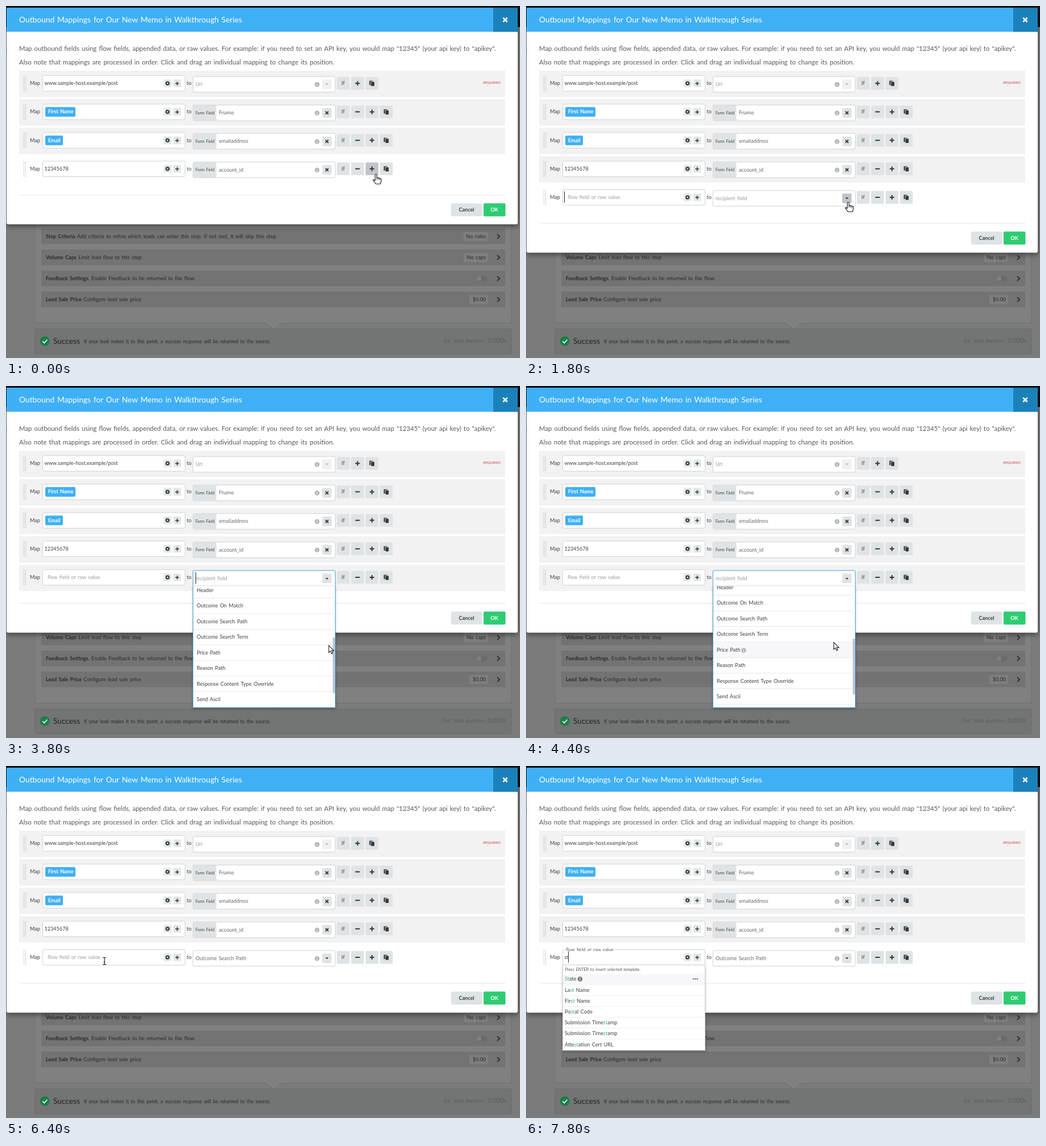
Recreate the animation shown at these times as an HTML page. Size 903 by 620 pixels, loop 8000 ms.

```html
<!DOCTYPE html>
<html lang="en">
<head>
<meta charset="utf-8">
<title>Mappings dialog</title>
<style>
  html, body { margin: 0; width: 100%; height: 100%; overflow: hidden; background: #7b7b7b; }
  svg { display: block; width: 903px; height: 620px; word-spacing: .07em; }
  text { font-family: Lato, "Open Sans", sans-serif; white-space: pre; }
  .dialog { filter: drop-shadow(0 3px 5px rgba(0, 0, 0, .5)); }
  .popup { filter: drop-shadow(0 2px 2px rgba(0, 0, 0, .25)); }
</style>
</head>
<body>
<svg id="stage" viewBox="0 0 903 620"></svg>
<script>
const LOOP = 8000, STEP = 200;
const ADD = 400, OPEN = 2200, PICK = 5600, FOCUS = 7000, SUGGEST = 7200;
const UI = 9.1, INK = '#3c4043', MUTED = '#9a9da0', BUTTON = '#dfe3e5', HOVER = '#c1c5c9';
const ROW = 50.2, ITEM = 27.45, LIST_TOP = 352, LIST_H = 214;

const fields = ['Basic Password', 'Basic Username', 'Capture', 'Cookie Search Term', 'Default Reason',
  'Encode Form Field Names', 'Form Field', 'Header', 'Outcome On Match', 'Outcome Search Path',
  'Outcome Search Term', 'Price Path', 'Reason Path', 'Response Content Type Override',
  'Send Ascii', 'Success Path', 'Url'];
const matches = ['State', 'Last Name', 'First Name', 'Postal Code', 'Submission Timestamp',
  'Submission Timestamp', 'Attestation Cert URL'];
const moreMatches = ['Address', 'Address 2', 'Sale Price', 'Source'];

// time, x, y of the pointer's hot spot
const pointerPath = [[0, 650, 296], [600, 650, 296], [1600, 566, 345], [2200, 566, 345],
  [2800, 575, 371], [3000, 575, 371], [3800, 567, 457], [4200, 567, 459],
  [5000, 399, 411], [5800, 399, 411], [6400, 173, 343], [8000, 173, 343]];
const scrollPath = [[0, 0], [3000, 0], [3800, 198], [4200, 203], [8000, 203]];

function along(path, t) {
  const i = Math.max(1, path.findIndex(p => p[0] >= t));
  const a = path[i - 1], b = path[i];
  const u = (t - a[0]) / (b[0] - a[0]), k = u * u * (3 - 2 * u);
  return a.slice(1).map((v, n) => v + (b[n + 1] - v) * k);
}

const rect = (x, y, w, h, fill, more = '') =>
  `<rect x="${x}" y="${y}" width="${w}" height="${h}" fill="${fill}" ${more}/>`;
const path = (d, stroke, width = 1, more = 'fill="none"') =>
  `<path d="${d}" stroke="${stroke}" stroke-width="${width}" ${more}/>`;
const at = (x, y, body) => `<g transform="translate(${x} ${y})">${body}</g>`;
const text = (x, cy, body, size = UI, fill = INK, more = '') =>
  `<text x="${x}" y="${cy + size * .34}" font-size="${size}" fill="${fill}" ${more}>${body}</text>`;
const BOLD = 'font-weight="700"', MID = 'text-anchor="middle"', END = 'text-anchor="end"';

const pen = document.createElement('canvas').getContext('2d');
function widthOf(str) {
  pen.font = `${UI}px Lato, "Open Sans", sans-serif`;
  return pen.measureText(str).width + (str.split(' ').length - 1) * .07 * UI;
}

const plus = (x, y, r, w) => path(`M${x - r} ${y}h${2 * r}M${x} ${y - r}v${2 * r}`, '#33373a', w);
const cross = (x, y, r, color, w) =>
  path(`M${x - r} ${y - r}l${2 * r} ${2 * r}M${x + r} ${y - r}l${-2 * r} ${2 * r}`, color, w);
const triangle = (x, y, dir, fill) =>
  `<path d="M${x - 2.8} ${y - 1.5 * dir}h5.6l-2.8 ${3 * dir}z" fill="${fill}"/>`;
const info = (x, y, fill = '#b0b3b5') =>
  `<circle cx="${x}" cy="${y}" r="4.2" fill="${fill}"/>` + path(`M${x} ${y - 2.5}v1.3M${x} ${y - .4}v2.9`, '#fff', 1.2);
const caret = (x, y) => path(`M${x} ${y - 10}v20`, '#222');

function gear(x, y) {
  return `<circle cx="${x}" cy="${y}" r="2.3" fill="none" stroke="#33373a" stroke-width="1.8"/>` +
    `<circle cx="${x}" cy="${y}" r="3.4" fill="none" stroke="#33373a" stroke-width="1.2" stroke-dasharray="1.33 1.33"/>`;
}

function tool(kind, x, y, fill = BUTTON) {
  const cx = x + 11.3;
  const icon = {
    if: () => text(cx, y, 'if', UI, INK, MID),
    plus: () => plus(cx, y, 4, 2),
    minus: () => path(`M${cx - 4} ${y}h8`, '#33373a', 2),
    copy: () => rect(cx - 4.5, y - 4.5, 6, 7.5, '#33373a') +
      rect(cx - 2, y - 3, 6.5, 8, '#33373a', `stroke="${fill}" stroke-width=".8"`)
  }[kind]();
  return rect(x, y - 11.2, 22.6, 22.4, fill, 'rx="2"') + icon;
}

function mappingRow(i, row) {
  const y = 136.2 + i * ROW, ry = y + 1.8;
  let s = row.plain ? '' : rect(23, y - 22.2, 854, 46.4, '#f2f2f3');
  for (const x of [31.5, 34.5]) s += path(`M${x} ${y - 13}v28`, '#b4b6b8', 1.3, 'stroke-dasharray="1.3 1.5"');
  s += text(42, y, 'Map') + text(317.5, y, 'to');
  s += rect(64.5, y - 13.6, 250, 27.4, '#fff', 'rx="2" stroke="#cfd2d4"');
  if (row.tag) {
    s += rect(69, y - 8.4, row.tagWidth, 17, '#3fb0f6', 'rx="2"') + text(74, y, row.tag, 8.9, '#fff', BOLD);
  } else s += text(row.valueX || 67.5, y, row.value || '', UI, row.valueColor || INK);
  s += rect(277, y - 6.8, 13.5, 13.6, '#e3e7e8', 'rx="2"') + gear(283.8, y);
  s += rect(294, y - 6.8, 13.5, 13.6, '#e3e7e8', 'rx="2"') + plus(300.7, y + .3, 3.3, 1.5);

  s += rect(328.5, ry - 13.8, 250, 27.6, '#fff', `rx="2" stroke="${row.open ? '#4a9fd8' : '#cfd2d4'}"`);
  if (row.formField) s += rect(328.5, ry - 13.8, 41, 27.6, BUTTON) + text(333, ry, 'Form Field', 6.9);
  s += text(row.formField ? 374 : 333, ry, row.target, UI, row.targetColor || '#66696c');
  if (row.info !== false) s += info(546.5, ry + .3);
  s += rect(555.5, ry - 8.5, 16.5, 17, row.button || BUTTON, 'rx="2"');
  s += row.formField ? cross(563.8, ry, 2.6, '#33373a', 1.8)
    : triangle(563.8, ry, row.open ? -1 : 1, i ? '#33373a' : '#b5b8ba');
  const tools = i ? ['if', 'minus', 'plus', 'copy'] : ['if', 'plus', 'copy'];
  tools.forEach((k, n) => s += tool(k, 581 + n * 25.3, y, row.hover === k ? HOVER : BUTTON));
  if (!i) s += text(869, y - 1, 'REQUIRED', 6.2, '#c8403a', END);
  return s;
}

function page() {
  let s = rect(0, 0, 903, 620, '#7b7b7b') + rect(0, 0, 903, 37, '#0e1215');
  s += '<circle cx="-3" cy="78" r="5" fill="#1c7f47"/>';
  s += rect(51, 300, 837, 258.5, '#808080', 'stroke="#707070"');
  const settings = [
    ['Step Criteria', 'Add criteria to refine which leads can enter this step. If not met, it will skip this step.', 'No rules', 43],
    ['Volume Caps', 'Limit lead flow to this step', 'No caps', 43],
    ['Feedback Settings.', 'Enable Feedback to be returned to the flow.'],
    ['Lead Sale Price', 'Configure lead sale price', '$0.00', 33]];
  settings.forEach(([name, note, pill, w], i) => {
    const y = 406 + i * 37;
    s += rect(62, y - 14, 815, 27.5, '#737373');
    s += text(70, y, `<tspan font-weight="700">${name}</tspan> ${note}`, UI, '#2a2b2c');
    s += pill ? rect(847 - w, y - 8, w, 16, '#7e7e7e', 'rx="2"') + text(843, y, pill, UI, '#2a2b2c', END)
      : rect(826, y - 4.5, 20, 9, '#6b6b6b', 'rx="4.5"') + `<circle cx="831" cy="${y}" r="4" fill="#808080"/>`;
    s += path(`M863 ${y - 4}l4 4l-4 4`, '#222', 1.6);
  });
  s += rect(51, 569, 837, 43.5, '#737474', 'rx="2" stroke="#6a6a6a"');
  s += '<path d="M455 558h30l-15 11z" fill="#808080"/>' + path('M455 558.5l15 10.5l15-10.5', '#707070');
  s += '<circle cx="68.3" cy="590.3" r="8.5" fill="#1c7f47"/>' + path('M64.3 590.5l3 3l5.2-5.8', '#d3dcd6', 2);
  s += text(83, 590, 'Success', 13.7, '#1f2021');
  s += text(137, 591, 'If your lead makes it to this point, a success response will be returned to the source.', 8.5, '#2a2b2c');
  return s + text(879, 589.5, 'Est. total duration: <tspan font-size="11">0.000s</tspan>', 8.9, '#5b5c5d', END);
}

function dialog(t) {
  const added = t >= ADD, grow = added ? ROW - .4 : 0;
  let s = rect(1, 3, 898, 381.6 + grow, '#fff', 'rx="3" class="dialog"');
  s += rect(1, 3, 898, 42.4, '#3fb0f6') + rect(856, 3, 43, 42.4, '#1b81ba') + cross(877, 24.3, 3.7, '#fff', 2.5);
  s += text(23, 24, 'Outbound Mappings for Our New Memo in Walkthrough Series', 13.8, '#fff');
  s += text(23, 75.5, 'Map outbound fields using flow fields, appended data, or raw values. For example: if you need to set an API key, you would map "12345" (your api key) to "apikey".', 11.4, '#55585b');
  s += text(23, 99, 'Also note that mappings are processed in order. Click and drag an individual mapping to change its position.', 11.4, '#55585b');

  const rows = [
    { value: 'www.sample-host.example/post', target: 'Url', targetColor: MUTED, button: '#eef0f1' },
    { tag: 'First Name', tagWidth: 53, target: 'Fname', formField: true },
    { tag: 'Email', tagWidth: 31, target: 'emailaddress', formField: true },
    { value: '12345678', target: 'account_id', formField: true, plain: !added, hover: t <= 600 && 'plus' }];
  if (added) rows.push(newRow(t));
  rows.forEach((row, i) => s += mappingRow(i, row));

  s += path(`M23 ${333 + grow}h854`, '#e2e4e5');
  const y = 359 + grow;
  s += rect(782, y - 11.5, 54, 23, BUTTON, 'rx="2"') + text(809, y, 'Cancel', UI, INK, `${BOLD} ${MID}`);
  s += rect(839, y - 11.5, 38.5, 23, '#2ecc71', 'rx="2"') + text(858, y, 'OK', UI, '#fff', `${BOLD} ${MID}`);
  return s;
}

const isOpen = t => t >= OPEN && t < PICK;
const typed = t => t >= 7600 ? 'st' : t >= 7400 ? 's' : '';

function newRow(t) {
  const picked = t >= PICK, floating = t >= SUGGEST;
  return {
    value: floating ? typed(t) : 'flow field or raw value',
    valueX: floating ? 67.5 : 73,
    valueColor: floating ? INK : MUTED,
    target: picked ? 'Outcome Search Path' : 'recipient field',
    targetColor: picked ? '#66696c' : MUTED,
    info: picked,
    open: isOpen(t),
    button: t >= 1600 && t < OPEN ? HOVER : BUTTON,
    plain: t < OPEN || t >= 6000
  };
}

function fieldList(t) {
  const [scroll] = along(scrollPath, t), [, py] = along(pointerPath, t);
  const active = t > 4200 ? Math.floor((py - LIST_TOP + scroll) / ITEM) : 0;
  let items = '';
  fields.forEach((name, i) => {
    const y = LIST_TOP + i * ITEM - scroll, cy = y + ITEM / 2;
    if (i === active) items += rect(329, y, 245, ITEM, '#f7f7f9');
    items += path(`M329 ${y + ITEM}h245`, '#e6e7e8') + text(335, cy, name);
    if (i === active) items += info(335 + widthOf(name) + 6.5, cy + .8);
  });
  return rect(328.5, LIST_TOP, 250, LIST_H + .5, '#fff', 'class="popup" stroke="#4a9fd8"') +
    rect(329, LIST_TOP - 1, 249, 2, '#fff') + path(`M329 ${LIST_TOP}h249`, '#dfe2e4') +
    `<clipPath id="list"><rect x="329" y="${LIST_TOP}" width="249" height="${LIST_H}"/></clipPath>` +
    `<g clip-path="url(#list)">${items}</g>` +
    rect(574, LIST_TOP + scroll * LIST_H / (fields.length * ITEM), 4, 98, '#c3c8d0');
}

function suggestions(t) {
  const query = typed(t), y0 = 365.8, pitch = 19.2;
  const list = query === 'st' ? matches : matches.concat(moreMatches);
  let s = rect(64.5, 350.5, 250, 15.8 + list.length * pitch, '#fff', 'class="popup" stroke="#cfd2d4"');
  s += text(68.5, 358, 'Press ENTER to insert selected template.', 7.6, '#55585b', 'font-style="italic"');
  list.forEach((name, i) => {
    const y = y0 + i * pitch, cy = y + pitch / 2;
    if (!i) s += rect(65, y, 249, pitch, '#f7f7f9');
    const marked = query ? name.replace(new RegExp(query, 'i'), '<tspan fill="#2cb888">$&</tspan>') : name;
    s += path(`M65 ${y + pitch}h249`, '#eeeff0') + text(68, cy, marked);
  });
  s += info(68 + widthOf(list[0]) + 6.5, 375.2, '#74787b');
  for (const x of [294, 297.5, 301]) s += `<circle cx="${x}" cy="375" r="1.3" fill="#74787b"/>`;
  return s + rect(69, 319, 84, 8, '#fff') + text(70, 323, 'flow field or raw value', 8.2, '#55585b');
}

function carets(t) {
  if ((t + 300) % 1000 >= 500) return '';
  if (isOpen(t)) return caret(333.5, 338);
  if (t >= ADD && t < OPEN || t >= FOCUS) return caret(67.5 + widthOf(typed(t)), 336.5);
  return '';
}

function pointer(t) {
  if (t >= 7400) return '';
  const [x, y] = along(pointerPath, t);
  if (t >= 6200) {
    const d = 'M-3-6q3 0 3 2v9q0 2-3 2M3-6q-3 0-3 2M0 5q0 2 3 2M-1.5 2h3';
    return at(x, y, path(d, '#fff', 2.6) + path(d, '#222', 1.2));
  }
  if (t <= 600 || t >= 1600 && t <= OPEN) {
    return at(x, y, path('M-1.5 1.5q1.5-2.5 3 0v5.5q1.5-1.5 2.7.2q1.5-1 2.5.6q2-.7 2.4 1.4v3.3l-1.6 5h-7.6l-5-6.6q.2-2.3 3.6.6z',
      '#222', 1.2, 'fill="#fff" stroke-linejoin="round"') + path('M1.5 7v3M4.2 7.5v3M6.7 8.2v2.6', '#222', .9));
  }
  return at(x, y, path('M0 0v12.5l2.9-2.6l2 4.6l2.2-1l-2-4.4h4z', '#222', 1.1, 'fill="#fff"'));
}

const stage = document.getElementById('stage');
const background = page();
let shown = -1;

function draw(now) {
  const t = Math.floor(now % LOOP / STEP) * STEP;
  if (t !== shown) {
    shown = t;
    stage.innerHTML = background + dialog(t) + (isOpen(t) ? fieldList(t) : '') +
      (t >= SUGGEST ? suggestions(t) : '') + carets(t) + pointer(t);
  }
  requestAnimationFrame(() => draw(performance.now() - start));
}

const start = performance.now();
draw(0);
</script>
</body>
</html>
```
